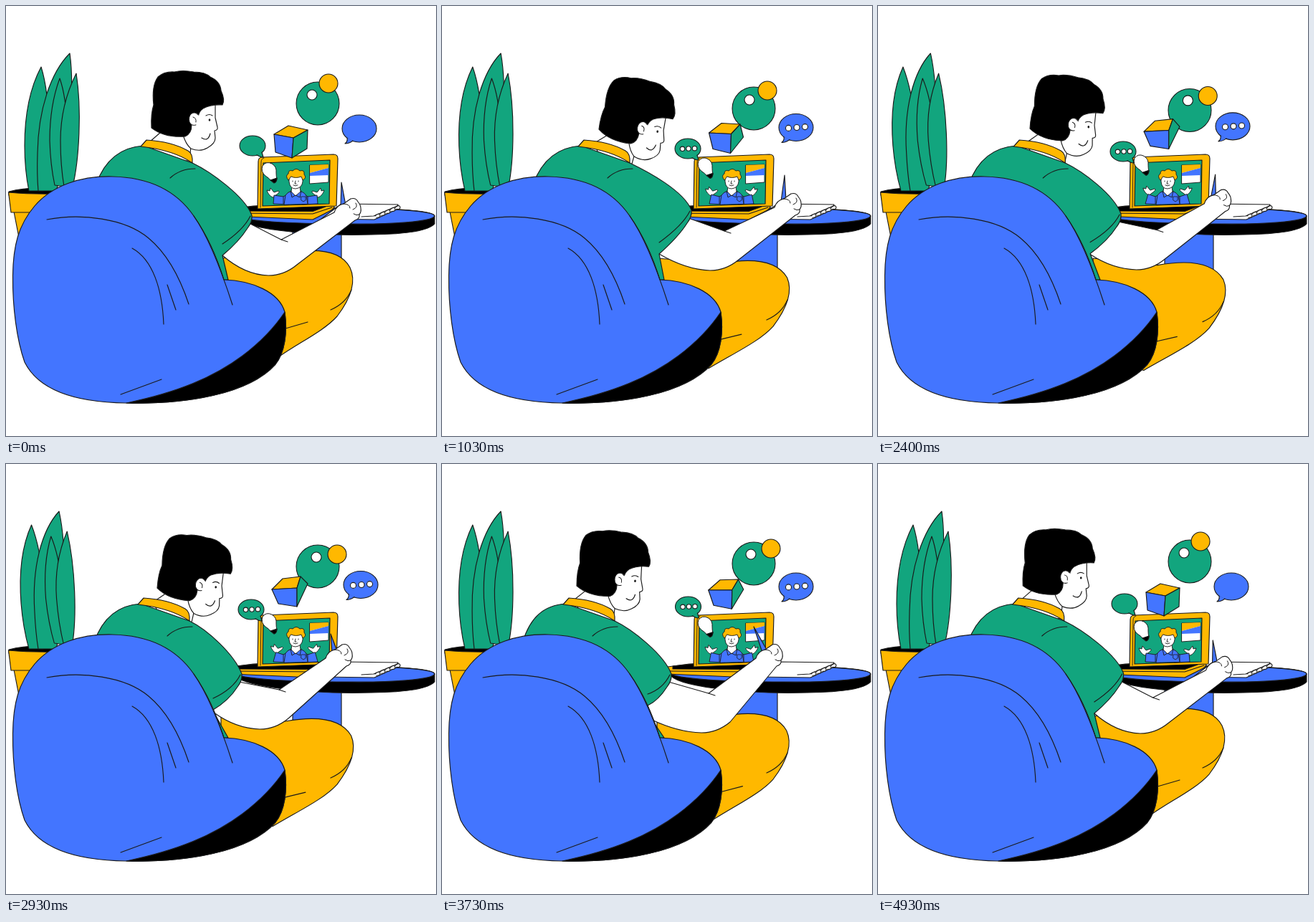
An HTML page with a canvas that plays this animation: 600x600 px, repeating every 5.01 s.

```html
<!DOCTYPE html>
<html lang="en">
<head>
<meta charset="utf-8">
<title>Online lesson</title>
<style>
html, body { margin: 0; width: 100%; height: 100%; overflow: hidden; background: #fff; }
canvas { display: block; width: 600px; height: 600px; }
</style>
</head>
<body>
<canvas id="stage" width="600" height="600"></canvas>
<script>
const ctx = document.getElementById('stage').getContext('2d');
const BLUE = '#4375ff', GREEN = '#12a57e', YELLOW = '#ffb800', WHITE = '#fff', INK = '#000', PEN = '#1a1a1a';
const LOOP = 5010, LAST_STEP = 99;
const KEYS = [0, 21, 36, 59, 75, 85, 100];
let step = 0;

// Smooth periodic track through six poses, without overshoot.
function track(...v) {
  const n = v.length, at = i => v[(i + n) % n];
  const span = i => KEYS[(i + n) % n + 1] - KEYS[(i + n) % n];
  const slope = i => (at(i + 1) - at(i)) / span(i);
  const tangent = i => {
    const a = slope(i - 1), b = slope(i);
    return a * b <= 0 ? 0 : 2 * a * b / (a + b);
  };
  let i = 0;
  while (i < n - 1 && step >= KEYS[i + 1]) i++;
  const h = span(i), u = (step - KEYS[i]) / h, w = 1 - u;
  return at(i) * w * w * (1 + 2 * u) + at(i + 1) * u * u * (3 - 2 * u)
    + h * u * w * (w * tangent(i) - u * tangent(i + 1));
}

const clamp = x => Math.max(0, Math.min(1, x));

function shape(d, fill, stroke = PEN, width = 1.15) {
  const path = new Path2D(d);
  if (fill) { ctx.fillStyle = fill; ctx.fill(path); }
  if (stroke) { ctx.strokeStyle = stroke; ctx.lineWidth = width; ctx.stroke(path); }
}

const line = (d, width) => shape(d, null, PEN, width);

function oval(x, y, rx, ry, fill) {
  ctx.beginPath();
  ctx.ellipse(x, y, rx, ry, 0, 0, 7);
  ctx.fillStyle = fill;
  ctx.fill();
  ctx.strokeStyle = PEN;
  ctx.lineWidth = 1.1;
  ctx.stroke();
}

function group(place, draw) {
  ctx.save();
  place();
  draw();
  ctx.restore();
}

function plant() {
  shape('M4 259 Q35 251 75 256 L75 268 L4 264Z', INK);
  const k = track(0, .42, .97, .91, .42, .18) * 16.5 / 193;
  group(() => ctx.transform(1, 0, k, 1, -k * 258, 0), () => {
    shape('M49 85 C33 115 26 155 26 195 Q26 228 32 258 L52 258 C62 205 63 130 49 85Z', GREEN);
    shape('M89 66 C62 93 45 145 44 205 Q43 235 45 258 L70 258 C88 205 96 115 89 66Z', GREEN);
    shape('M75 101 C66 125 61 155 61 188 Q62 222 68 250 L82 252 C89 205 87 135 75 101Z', GREEN);
    shape('M98 94 C84 122 76 155 76 188 Q76 222 81 252 L93 252 C102 215 106 145 98 94Z', GREEN);
  });
  shape('M11 287 L19 328 H75 V287Z', YELLOW);
  shape('M3.5 260 Q35 263 75 262 V288 H7Z', YELLOW);
}

function table() {
  shape('M400 305 H468 V385 H400Z', BLUE);
  shape('M318 293 Q320 280 458 282 Q598 282 598 293 V304 Q586 318 510 319 Q440 321 380 313 Q322 305 318 293Z', INK);
  shape('M318 292 C325 279 410 281 458 282 C535 282 598 286 598 293 C596 301 535 305 475 304 C400 304 325 300 318 292Z', BLUE);
}

function notebook() {
  shape('M468 276 L547 277 L545 284 L514 298 L440 297Z', WHITE);
  line('M496 294 L513 293 L546 279');
  for (let i = 0; i < 5; i++) {
    const x = 515 + i * 7, y = 293 - i * 2.9;
    shape(`M${x} ${y} q5 -5 7 -1 q0 4 -5 3`, WHITE);
  }
}

function teacher(lift) {
  const dx = lift * 6, dy = -lift * 3;
  for (const side of [-1, 1]) {
    group(() => { ctx.translate(404, 0); ctx.scale(side, 1); }, () => {
      shape(`M${29 - dx} ${265 + dy} q-9 -6 -5 -7 l6 2 l5 -6 l1 4 l4 -1 q-2 7 -8 10Z`, WHITE, PEN, .9);
      shape(`M10 262 L17 266 L${30 - dx / 2} ${264 + dy / 2} L31 276 L10 277Z`, BLUE, PEN, .9);
      line('M17 266 V276', .9);
    });
  }
  shape('M388 277 L390 264 Q393 259 400 258 H409 Q417 260 419 265 L421 276Z', BLUE, PEN, .9);
  shape('M399 252 L398 259 L404 265 L411 259 L410 252Z', WHITE, PEN, .9);
  line('M397 258 L399 267 L404 264 L410 267 L412 258', .9);
  shape('M412 266 h6 v5 l-3 2 l-3 -2Z', BLUE, PEN, .8);
  shape('M395 236 V245 Q396 255 404 255 Q413 254 414 245 V236Z', WHITE, PEN, .9);
  shape('M394 243 Q389 237 394 234 Q394 228 400 230 Q405 225 410 230 Q417 228 416 235 Q420 240 414 243 L412 238 Q404 241 398 238Z', YELLOW, PEN, .9);
  line('M400 244 v1 M408 244 v1 M404 244 l-1 4 h2 M401 250 q3 2 6 0', .9);
}

function laptop(lift) {
  shape('M315 283 L345 279 L458 278 Q459 283 452 286 L428 298 L315 293Z', YELLOW);
  shape('M322 282 L350 279 L446 280 L428 286.5 L322 286Z', INK);
  line('M318 289 L428 290 L455 281');
  shape('M351 283 L352 217 Q352 211 358 211 L457 207 Q463 207 463 213 L461 279Z', YELLOW);
  line('M355 281 L356 218 Q356 213 360 212', .9);
  shape('M359 219 L452 215 L451 276 L358 279Z', GREEN);
  shape('M424 222 L450 221 V246 L424 248Z', WHITE, PEN, .9);
  shape('M424 222 L450 221 V226 L424 233Z', YELLOW, null);
  shape('M424 233 L450 226 V236 L424 237Z', BLUE, null);
  teacher(lift);
  group(() => ctx.translate(0, -11 * lift), () => {
    shape('M369 243 Q367 240 362 237 Q355 231 358 223 Q363 216 371 220 Q378 224 377 233 Q377 238 378 241Z', WHITE, PEN, 1);
    shape('M369 243 L378 240 Q378 246 374 247Z', INK);
  });
}

function bubble(x, y, rx, ry, fill, tail, gap, r, tilt) {
  oval(x, y, rx, ry, fill);
  shape(tail, fill, null);
  line(tail);
  for (let i = 0; i < 3; i++) {
    const size = clamp((step - 6 - i * 4) / 5) * clamp((97 - i * 2 - step) / 5);
    if (size > 0) oval(x + 1 + (i - 1) * gap, y + (1 - i) * tilt, r * size, r * size, WHITE);
  }
}

function cube() {
  const turn = track(0, .5, .85, 1, .75, .4);
  const mix = (x0, y0, x1, y1) => `${x0 + (x1 - x0) * turn} ${y0 + (y1 - y0) * turn}`;
  const left = mix(374, 179, 371, 175), back = mix(394, 167, 386, 160);
  const right = mix(421, 173, 411, 157), front = mix(401, 184, 406, 173);
  const base = mix(399, 212, 406, 199), baseLeft = mix(376, 204, 380, 195);
  const baseRight = mix(420, 199, 421, 167);
  shape(`M${left} L${back} L${right} L${front}Z`, YELLOW);
  shape(`M${left} L${front} L${base} L${baseLeft}Z`, BLUE);
  shape(`M${front} L${right} L${baseRight} L${base}Z`, GREEN);
}

function icons() {
  oval(435, track(136, 143, 147, 143, 139, 137), 30, 30, GREEN);
  oval(track(450, 454, 457, 462, 459, 456), track(108, 118, 124, 126, 118, 113), 13, 13, YELLOW);
  oval(track(427, 429, 431, 433, 431, 430), track(124, 131, 133, 130, 126, 125), 7, 7, WHITE);
  cube();
  const gx = track(344, 343, 342, 342, 343.5, 343), gy = track(195, 199, 203, 203, 199, 197);
  bubble(gx, gy, 18, 14, GREEN, `M${gx + 6} ${gy + 13} Q${gx + 11} ${gy + 16} ${gx + 15} ${gy + 16} L${gx + 13} ${gy + 9}`, 8.5, 3.2, .3);
  const bx = track(493, 494, 495, 495, 494, 493.5), by = track(171, 169.5, 167.5, 168.5, 171, 171);
  bubble(bx, by, 24, 19, BLUE, `M${bx - 17} ${by + 13} Q${bx - 16} ${by + 18} ${bx - 20} ${by + 21} Q${bx - 14} ${by + 21} ${bx - 9} ${by + 17}`, 11.5, 4, .9);
}

function legs() {
  const k = track(0, .78, 1, .78, .39, .17), y = v => v + 18 * k;
  shape(`M300 352 L390 ${y(345)} C435 ${y(337)} 468 ${y(342)} ${480 + k * 2} ${y(365)}
    C${489 + k} ${y(384)} 481 ${y(408)} 462 ${y(433)}
    C443 ${y(454)} 408 ${y(470)} ${380 - 10 * k} ${y(490) + 2 * k} L300 480Z`, YELLOW);
  line(`M453 ${y(424)} Q474 ${y(415)} 482 ${y(396)}`);
  line(`M${390 - 4 * k} ${y(450) + 2 * k} L${421 - 4 * k} ${y(441) + 4 * k}`);
}

function torso() {
  const s = track(0, 2, 4, -4, -19, -12);
  const cx = track(343, 348, 347, 329, 320, 329), cy = track(297, 290, 291, 298, 298, 294);
  const bx = track(302, 303, 303, 289, 287, 289), by = track(348, 346, 347, 343, 337, 343);
  const drop = track(0, 0, 0, 4, 20, 6);
  const ex = track(393, 403, 403, 390, 381, 387), ey = track(329, 317, 314, 318, 323, 326);
  const lx = track(366, 374, 370, 354, 362, 363), ly = track(376, 369, 367, 370, 375, 374);
  const hx = track(495, 501, 500, 483, 475, 484), hy = track(284, 277, 277, 267, 267, 270);

  const px = track(468, 478, 483, 453, 435, 449), py = track(246, 236, 233, 237, 227, 239);
  shape(`M${px} ${py} L${hx - 28} ${hy - 4} L${hx - 21} ${hy - 6}Z`, BLUE);

  shape(`M${cx - 4} ${cy + 6} L${ex - 9} ${ey - 3} L${hx - 37} ${hy + 4}
    q3 -10 13 -12 l10 -7 q7 -2 10 4 q4 5 4 9 q1 5 -2 9 q1 6 -6 8
    L${lx + 40} ${ly - 15} Q${lx + 22} ${ly} ${lx} ${ly} Q${lx - 33} ${ly - 1} ${bx + drop * .3} ${by + drop} L${bx} ${by}`, WHITE);
  line(`M${ex - 9} ${ey - 3} L${ex} ${ey}`);
  line(`M${hx - 25} ${hy - 8} q10 0 10 6 M${hx - 7} ${hy - 9} q4 6 -4 9 M${hx - 2} ${hy + 7} q-4 2 -8 -1`, 1);

  const tilt = track(0, 10, 5, 7, 3, 1) * Math.PI / 180;
  const mx = track(0, 16, 10, 8, -15, -11), my = track(0, 2, -1, 3, 0, -2);
  const headSpace = () => {
    ctx.translate(203 + mx, 170 + my);
    ctx.rotate(tilt);
    ctx.translate(-203, -170);
  };
  group(headSpace, () => shape('M216 176 L200 190 L215 215 L256 216 L258 196', WHITE));

  shape(`M${126 + .7 * s} 248 C${138 + .8 * s} 215 ${160 + s} 197 ${192 + s} 195 L${260 + s} 219
    C${285 + s} 231 ${cx - 10} ${cy - 32} ${cx} ${cy - 5} Q${cx + 1} ${cy + 4} ${cx - 6} ${cy + 13}
    Q${cx - 18} ${cy + 32} ${bx} ${by} L${bx + drop * .3} ${by + drop} L310 382 L200 382Z`, GREEN);
  line(`M${bx} ${by - 16} Q${cx - 12} ${cy + 16} ${cx - 2} ${cy - 4}`);
  line(`M${229 + s} 240 Q${243 + s} 227 ${264 + s} 227`);
  group(() => ctx.translate(s, 0), () =>
    shape('M188 196 L196 187 Q231 189 254 202 Q261 206 260 219 Q234 201 188 196Z', YELLOW));
  group(headSpace, head);
}

function head() {
  shape('M247 180 Q251 193 258 199 Q271 204 281 198 Q292 192 292 184 L291 174 Q296 173 295 169 L292 156 L292 136 L262 143Z', WHITE);
  shape('M203 170 Q202 150 206 138 Q203 111 212 99 Q221 91 235 92 Q246 89 262 92 Q278 92 285 99 Q299 105 300 118 Q306 131 302 138 Q286 137 275 143 Q269 147 268 155 L259 166 Q259 178 250 182 Q221 184 203 170Z', INK);
  shape('M269 153 Q266 147 259 150 Q254 154 256 162 Q259 168 266 167 L271 160Z', WHITE, null);
  line('M268 152 Q264 147 259 150 Q254 154 256 162 Q259 168 265 166 M261 155 q5 1 4 7', 1);
  line('M279 153 Q284 150 288 153', 1.1);
  oval(284, 159, .8, 1.1, INK);
  line('M273 184 Q282 190 285 178', 1.2);
}

function chair() {
  shape('M168 554 C90 553 44 533 26 497 C15 466 9 420 9.5 376 C10 335 17 306 40 279 C65 250 105 237 148 238 C205 239 240 261 262 293 Q288 330 304 382 C343 383 381 399 389 427 C393 455 389 484 376 500 C338 542 250 556 168 554Z', BLUE);
  shape('M389 427 C393 455 389 484 376 500 C338 542 250 556 168 554 C240 539 290 518 330 488 Q367 460 389 427Z', INK);
  line('M262 293 Q288 330 316 417');
  line('M57 298 C105 289 166 296 199 324 Q234 353 255 416');
  line('M176 338 C205 354 218 395 220 444');
  line('M225 389 L237 424');
  line('M160 542 L217 521');
}

function render() {
  const t = performance.now() % LOOP;
  step = Math.min(LAST_STEP, 2 * Math.floor(t / 100) + (t % 100 >= 30 ? 1 : 0));
  ctx.fillStyle = WHITE;
  ctx.fillRect(0, 0, 600, 600);
  ctx.lineJoin = ctx.lineCap = 'round';
  plant();
  table();
  laptop(track(0, .6, 1, .9, .5, .2));
  notebook();
  icons();
  legs();
  torso();
  chair();
  requestAnimationFrame(render);
}
render();
</script>
</body>
</html>
```
